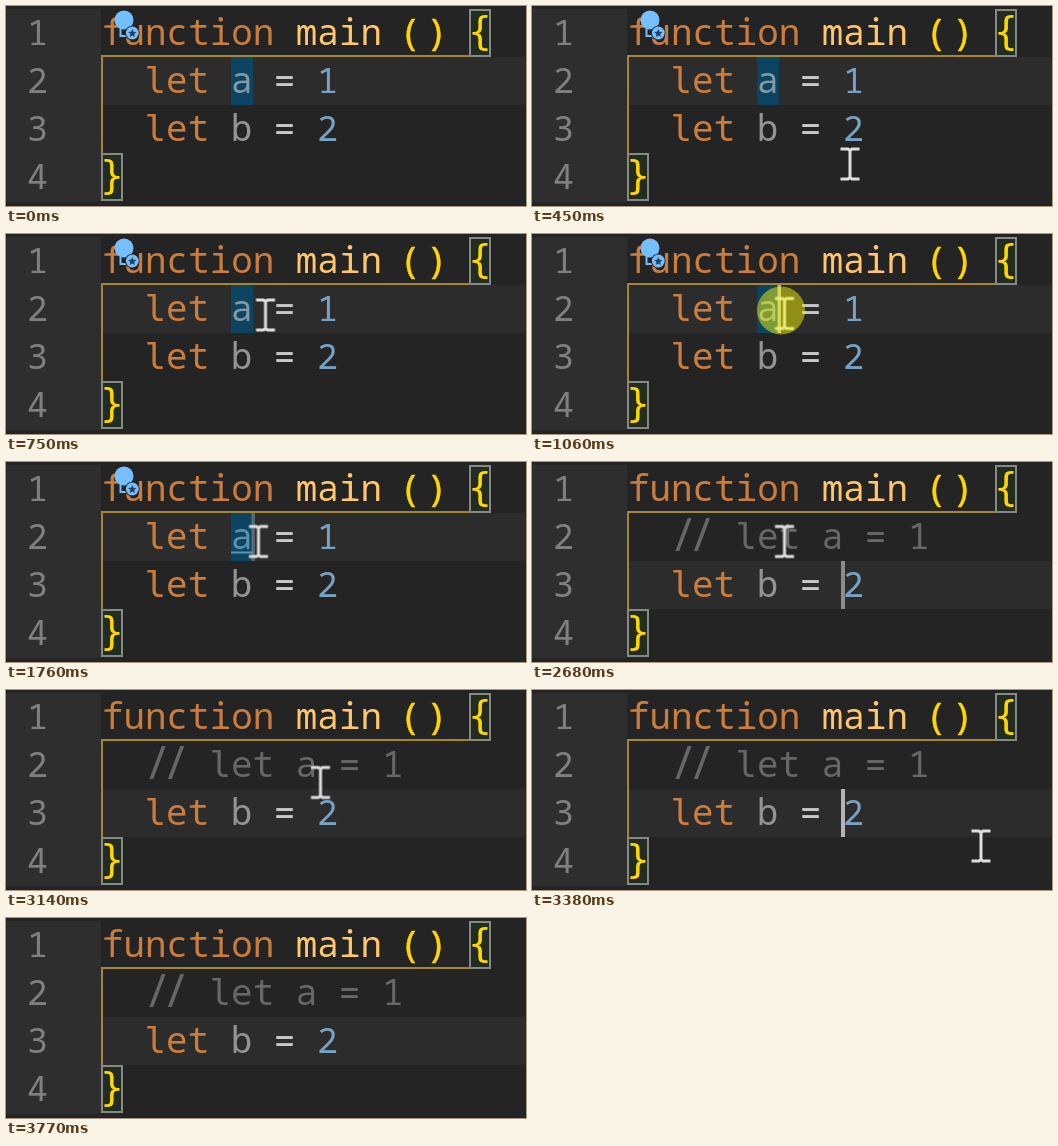
An HTML page that plays this animation: 520 by 200 pixels, repeating every 3.86 s.

```html
<!DOCTYPE html>
<html lang="en">
<head>
<meta charset="utf-8">
<title>Editor: toggle comment</title>
<style>
  html, body { margin: 0; width: 520px; height: 200px; overflow: hidden; background: #242424; }
  svg { display: block; }
  text {
    font: 35.9px "Noto Sans Mono", "DejaVu Sans Mono", monospace;
    font-variant-ligatures: none;
    white-space: pre;
  }
  .num { fill: #808080; }
  .num text, .lit { font-size: 35px; }
  .kw { fill: #cb7d3e; }
  .fn { fill: #ffc66d; }
  .br { fill: #ffd700; stroke: #ffd700; stroke-width: .5; }
  .op { fill: #c8c8c8; }
  .lit { fill: #78a2c3; }
  .unused { fill: #949494; }
  .cm { fill: #676767; }
  .hook { font-family: "DejaVu Sans Mono", monospace; } /* l with a curved foot */
  .brace { font: 39px "DejaVu Sans Mono", monospace; text-anchor: middle; stroke: none; }
  .slash { font-size: 45px; text-anchor: middle; }
  .box { fill: #222c20; stroke: #868a84; stroke-width: 2; }
  .guide { fill: none; stroke: #a5862a; stroke-width: 2; }
  .caret { fill: #b4b4b2; }

  .row, .before, .after, .link, .plain, .dim, .bulb, .caret, .click, .mouse {
    animation: 3860ms step-end infinite;
  }
  .row { animation-name: row; }
  .before { animation-name: before; }
  .after { animation-name: after; }
  .plain { animation-name: plain; }
  .link { animation-name: link; }
  .dim { animation-name: dim; }
  .bulb { animation-name: bulb; }
  .caret.top { animation-name: caret-top; }
  .caret.low { animation-name: caret-low; }
  .click { animation-name: click; }
  .mouse { animation-name: mouse; }

  @keyframes row { 0% { transform: none; } 53.35%, 100% { transform: translateY(48px); } }
  @keyframes before { 0% { opacity: 1; } 53.35%, 100% { opacity: 0; } }
  @keyframes after { 0% { opacity: 0; } 53.35%, 100% { opacity: 1; } }
  @keyframes plain { 0% { opacity: 1; } 45.58%, 100% { opacity: 0; } }
  @keyframes link { 0% { opacity: 0; } 45.58%, 100% { opacity: 1; } }
  @keyframes dim { 0% { fill: #524d4a; } 61.38%, 100% { fill: #676767; } }
  @keyframes bulb { 0% { opacity: 1; } 63.45%, 100% { opacity: 0; } }
  @keyframes caret-top {
    0% { opacity: 0; }
    27.45% { opacity: 1; }
    45.58% { opacity: .4; }
    47.65%, 100% { opacity: 0; }
  }
  @keyframes caret-low {
    0% { opacity: 0; }
    53.35% { opacity: 1; }
    69.42% { opacity: .7; }
    71.49% { opacity: .3; }
    73.3% { opacity: 0; }
    83.4% { opacity: 1; }
    95.58% { opacity: .4; }
    97.65%, 100% { opacity: 0; }
  }
  @keyframes click { 0% { opacity: 0; } 27.45% { opacity: 1; } 31.33%, 100% { opacity: 0; } }
  @keyframes mouse {
    0% { transform: translate(340px, 230px); }
    9.83% { transform: translate(340px, 190px); }
    11.65% { transform: translate(318px, 158px); }
    13.71% { transform: translate(293px, 123px); }
    15.53% { transform: translate(275px, 99px); }
    17.6% { transform: translate(264px, 86px); }
    19.42% { transform: translate(259.5px, 81px); }
    25.37% { transform: translate(252.5px, 79.5px); }
    81.33% { transform: translate(314.5px, 92.5px); }
    83.4% { transform: translate(381px, 116px); }
    85.47% { transform: translate(428px, 142px); }
    87.55% { transform: translate(449px, 156px); }
    89.62%, 100% { transform: translate(340px, 230px); }
  }
</style>
</head>
<body>
<svg width="520" height="200" viewBox="0 0 520 200">
  <rect width="520" height="200" fill="#242424"/>
  <rect y="3" width="95" height="193" fill="#2e2e2e"/>
  <rect y="199" width="520" height="1" fill="#2a1e22"/>
  <rect class="row" x="96" y="51" width="424" height="48" fill="#2c2c2c"/>
  <rect class="before" x="225" y="51" width="22" height="48" fill="#0c4461"/>

  <path class="guide" d="M485 50H96V147"/>
  <rect class="box" x="464" y="4" width="20" height="46"/>
  <rect class="box" x="96" y="148" width="20" height="46"/>

  <g class="num">
    <text x="21" y="39">1</text>
    <text x="21" y="87">2</text>
    <text x="21" y="135">3</text>
    <text x="21" y="183">4</text>
  </g>

  <text x="96" y="39"><tspan class="kw">function</tspan> <tspan class="fn">main</tspan></text>
  <g class="br">
    <text x="393.5" y="39">(</text>
    <text x="420" y="39">)</text>
    <text class="brace" x="474" y="39">{</text>
    <text class="brace" x="106" y="183">}</text>
  </g>

  <g class="before">
    <text x="138.5" y="87"><tspan class="kw"><tspan class="hook">l</tspan>et</tspan>   <tspan class="op" dy="1">=</tspan> <tspan class="lit" dy="-1">1</tspan></text>
    <text class="plain" x="225" y="87" fill="#8399a5">a</text>
    <g class="link" fill="#5a91b5">
      <text x="225" y="87">a</text>
      <rect x="225" y="89.5" width="21.5" height="2"/>
    </g>
  </g>
  <g class="after cm">
    <text class="slash" x="151.5" y="89">/</text>
    <text class="slash" x="170" y="89">/</text>
    <text x="203.5" y="87"><tspan class="hook">l</tspan>et <tspan class="dim">a</tspan> <tspan dy="1">=</tspan> <tspan dy="-1">1</tspan></text>
  </g>

  <text x="138.5" y="135"><tspan class="kw"><tspan class="hook">l</tspan>et</tspan> <tspan class="unused">b</tspan> <tspan class="op" dy="1">=</tspan> <tspan class="lit" dy="-1">2</tspan></text>

  <rect class="caret top" x="245.5" y="51" width="3.5" height="48"/>
  <rect class="caret low" x="309" y="99" width="4" height="48"/>

  <g class="bulb">
    <path d="M113.5 20h9v10.5h-9z" fill="#242424"/>
    <path d="M114.5 21v9h7" fill="none" stroke="#75beff" stroke-width="2"/>
    <circle cx="118" cy="14" r="9.5" fill="#75beff"/>
    <circle cx="126.3" cy="27" r="7.3" fill="#242424"/>
    <circle cx="126.3" cy="27" r="6.4" fill="#75beff"/>
    <path d="M126.3 23l1.2 2.7 2.9.3-2.2 2 .6 2.9-2.5-1.5-2.5 1.5.6-2.9-2.2-2 2.9-.3z" fill="#24405a"/>
  </g>

  <g class="mouse">
    <path d="M-9.5 -15H-2L0 -13.5L2 -15H9.5M-9.5 15H-2L0 13.5L2 15H9.5M0 -14V14"
          fill="none" stroke="#dedede" stroke-width="3"/>
  </g>
  <circle class="click" cx="249" cy="76.5" r="24" fill="#ff0" fill-opacity=".47"/>
</svg>
</body>
</html>
```
